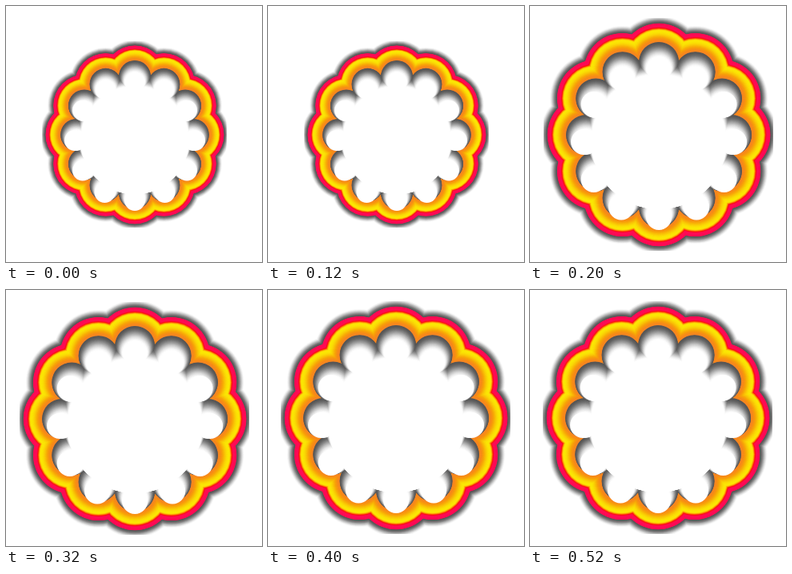
Animation of 320x320 px, one loop 0.6 s. Source, as an HTML page with a canvas:

```html
<!DOCTYPE html>
<html lang="en">
<head>
<meta charset="utf-8">
<title>Pulsing flower ring</title>
<style>
html, body { margin: 0; width: 100%; height: 100%; overflow: hidden; background: #fff; }
canvas { display: block; width: 320px; height: 320px; }
</style>
</head>
<body>
<canvas id="stage" width="320" height="320"></canvas>
<script>
const ctx = document.getElementById('stage').getContext('2d');
const TAU = Math.PI * 2;
const LOBES = 12;
const REACH = 91;    // distance from the middle to each lobe centre
const EDGE = 25;     // radius of the inner lobes
const RIM = 48.3;    // radius of the outer lobes
const GLOW = 10;     // width of the outer shadow
const DROP = 9;      // how far the white middle sits below the ring
const STEP_MS = 200;

function smooth(from, to, v) {
  const t = Math.max(0, Math.min(1, (v - from) / (to - from)));
  return t * t * (3 - 2 * t);
}

const gray = v => `rgb(${v},${v},${v})`;

// Pink rim, yellow middle, orange inner edge; t runs from outside to inside
function bandColor(t) {
  const hue = 342 + 73 * smooth(0.17, 0.38, t) - 27 * smooth(0.42, 1, t);
  const light = 52 + 5 * smooth(0.7, 1, t) - 2 * smooth(0.2, 0.4, t);
  return `hsl(${hue % 360},${100 - 8 * t}%,${light}%)`;
}

// Union of a round core and a circle for every lobe
function flower(reach, radius, core, dy, fill) {
  ctx.fillStyle = fill;
  ctx.beginPath();
  ctx.arc(0, dy, core, 0, TAU);
  for (let i = 0; i < LOBES; i++) {
    const a = i / LOBES * TAU;
    const x = Math.sin(a) * reach, y = dy - Math.cos(a) * reach;
    ctx.moveTo(x + radius, y);
    ctx.arc(x, y, radius, 0, TAU);
  }
  ctx.fill();
}

function outerShadow() {
  for (let d = GLOW; d > 0; d -= 0.25) {
    flower(REACH, RIM + d, 88, 0, gray(85 + 170 * smooth(0, GLOW, d)));
  }
}

function ring() {
  for (let d = RIM; d > EDGE; d -= 0.25) {
    flower(REACH, d, 88, 0, bandColor((RIM - d) / (RIM - EDGE)));
  }
}

// The shade fades inwards while sliding down to meet the white middle
function innerShade() {
  for (let k = 0; k <= 1; k += 0.025) {
    flower(REACH, EDGE - 10 * k, 91 - 7 * k, DROP * k, gray(85 + 170 * smooth(0, 1, k)));
  }
}

// Crisp white petals that overlap the ring on the sides and below
function whiteMiddle() {
  ctx.beginPath();
  ctx.rect(-160, -54, 320, 214);
  ctx.clip();
  flower(REACH + 3, 16, 84, DROP, '#fff');
}

function draw(step) {
  const size = step === 0 ? 0.8 : 1;
  const middle = step === 2 ? 159.5 : 160.5;
  ctx.fillStyle = '#fff';
  ctx.fillRect(0, 0, 320, 320);
  ctx.save();
  ctx.translate(middle, middle);
  ctx.scale(size, size);
  ctx.beginPath();
  ctx.rect(-143.5, -145.5, 287, 291);
  ctx.clip();
  ctx.translate(0.6, 0.5);
  outerShadow();
  ring();
  innerShade();
  whiteMiddle();
  ctx.restore();
}

const start = performance.now();
let shown = -1;

function tick() {
  const step = Math.floor((performance.now() - start) / STEP_MS) % 3;
  if (step !== shown) {
    draw(step);
    shown = step;
  }
  requestAnimationFrame(tick);
}
tick();
</script>
</body>
</html>
```
